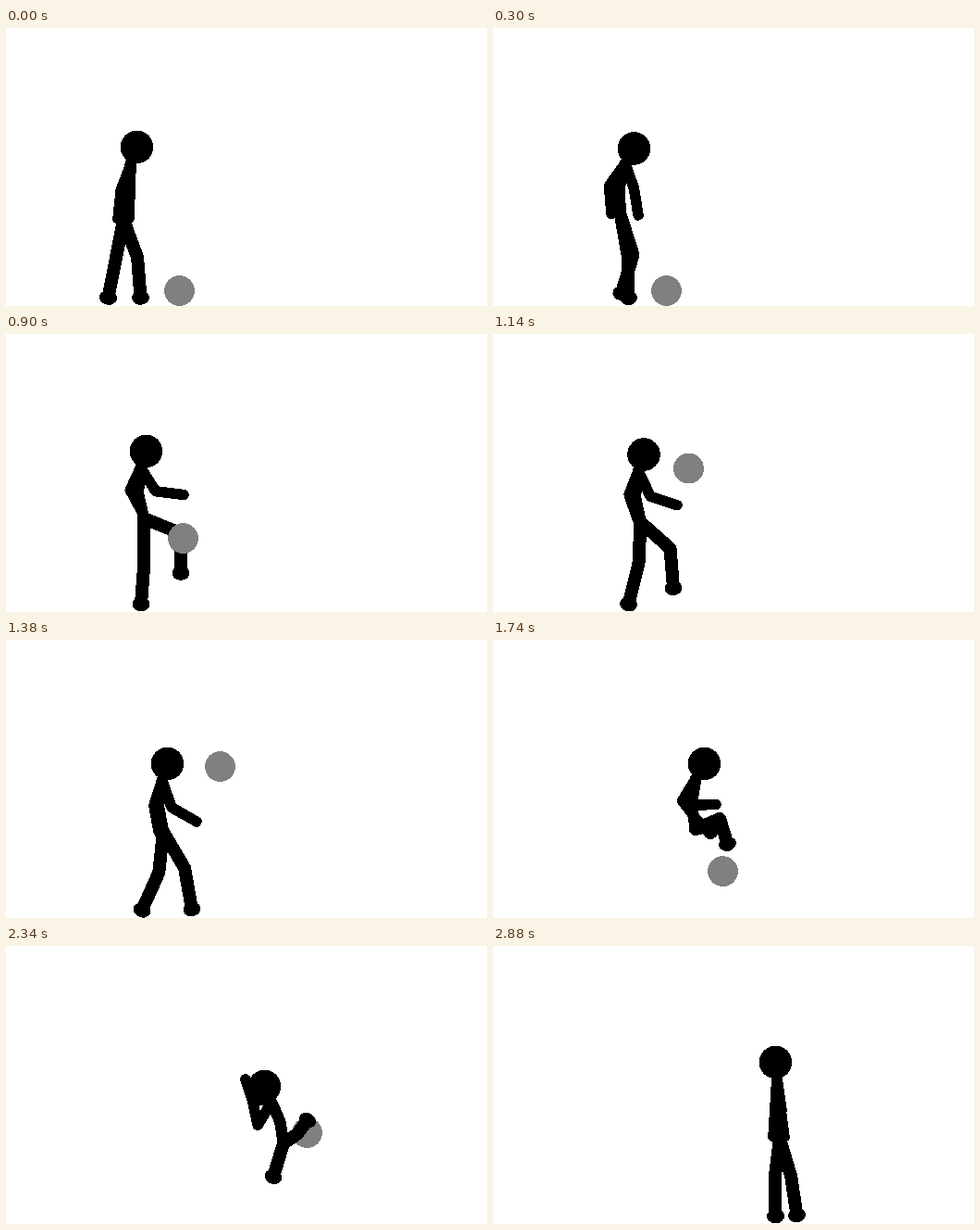
These frames come from a looping animation (520x300 px, 2.94 s). An HTML page:

```html
<!DOCTYPE html>
<html lang="en">
<head>
<meta charset="utf-8">
<title>Ball juggling</title>
<style>
  html, body { margin: 0; width: 100%; height: 100%; overflow: hidden; background: #fff; }
  svg { display: block; width: 520px; height: 300px; }
  polyline { fill: none; stroke: #000; stroke-linecap: round; stroke-linejoin: round; }
</style>
</head>
<body>
<svg viewBox="0 0 520 300" shape-rendering="crispEdges"></svg>
<script>
const LOOP = 2940, STEP = 60;
const FLOOR = 283.5, GRAVITY = 1164, NECK = 18.5;
const svg = document.querySelector('svg');

function set(node, attrs) {
  for (const name in attrs) node.setAttribute(name, attrs[name]);
}

function add(tag, attrs) {
  const node = document.createElementNS('http://www.w3.org/2000/svg', tag);
  set(node, attrs);
  return svg.appendChild(node);
}

const line = width => add('polyline', { 'stroke-width': width });
const foot = () => add('ellipse', { rx: 9.5, ry: 7.8 });
const head = add('circle', { r: 17.8 });
const spine = line(12.5);
const arms = [line(11.5), line(11.5)];
const legs = [line(14), line(14)];
const feet = [foot(), foot()];
const ball = add('circle', { r: 16.4, fill: '#808080' });

// Each limb ends at x, y and bows sideways by an optional bend.
const poses = [
  { time: 0, head: [141.5, 128.5], nod: [20], hip: [127, 207],
    arms: [[121, 206, -4], [133, 206]], legs: [[110.5, 291], [145.5, 291, 6]] },
  { time: 600, head: [163.5, 131.5], nod: [41], hip: [149.5, 199],
    arms: [[135, 195, -17], [181, 198, 5]], legs: [[167, 282, 26], [147.5, 291.5, 1]] },
  { time: 900, head: [151.5, 126.5], nod: [19], hip: [149, 199],
    arms: [[147, 192, -12], [192, 173.5, -13]], legs: [[189, 258, 24], [146, 291.5, 2]] },
  { time: 1380, head: [174.5, 133.5], nod: [18], hip: [170, 207],
    arms: [[165, 207, -7], [206, 196, -11]], legs: [[201, 290.5, 8], [147, 291.5, 7]] },
  { time: 1740, head: [228.5, 133.5], nod: [30], hip: [219, 204],
    arms: [[222, 196, -16], [241, 177.5, -24]], legs: [[253.5, 220, 21], [236, 206, 3]] },
  { time: 2340, head: [279.5, 151.5], nod: [-24], hip: [300, 213],
    arms: [[266, 165, 27], [259, 144, 11]], legs: [[326, 188, -3], [289, 249]] },
  { time: 2880, head: [305.5, 125.5], nod: [-4], hip: [310, 208],
    arms: [[303, 206], [315, 206]], legs: [[328.5, 290.5, 3], [305.5, 291.5, -3]] },
];

const rolling = [[0, 187.5], [480, 187.5], [600, 177.5], [780, 181.5],
  [1620, 251.5], [1740, 248.5], [2340, 325.5], [2940, 365]]
  .map(([time, x]) => ({ time, x: [x] }));

// Returns a reader that blends any part of the keys around the given time.
function blend(keys, time) {
  const next = Math.max(1, keys.findIndex(key => key.time >= time));
  const a = keys[next - 1], b = keys[next];
  const k = (time - a.time) / (b.time - a.time);
  return pick => {
    const [from, to] = [pick(a), pick(b)];
    return [0, 1, 2].map(i => (from[i] || 0) * (1 - k) + (to[i] || 0) * k);
  };
}

function drawLimb(node, [x0, y0], [x1, y1, bend]) {
  const dx = x1 - x0, dy = y1 - y0, k = bend / Math.hypot(dx, dy);
  const joint = [(x0 + x1) / 2 + dy * k, (y0 + y1) / 2 - dx * k];
  set(node, { points: [x0, y0, ...joint, x1, y1] });
  return joint;
}

function drawFigure(time) {
  const part = blend(poses, time);
  const [x, y] = part(p => p.head), [hipX, hipY] = part(p => p.hip);
  const tilt = part(p => p.nod)[0] * Math.PI / 180;
  const neck = [x - NECK * Math.sin(tilt), y + NECK * Math.cos(tilt)];
  set(head, { cx: x, cy: y });
  drawLimb(spine, neck, [hipX, hipY, tilt > 0 ? -4.5 : 3]);
  for (const side of [0, 1]) {
    drawLimb(arms[side], neck, part(p => p.arms[side]));
    const ankle = part(p => p.legs[side]);
    const knee = drawLimb(legs[side], [hipX, hipY], ankle);
    const turn = Math.atan2(ankle[1] - knee[1], ankle[0] - knee[0]) * 180 / Math.PI - 90;
    set(feet[side], { transform: `translate(${ankle[0]} ${ankle[1]}) rotate(${turn})` });
  }
}

// The ball is flicked off the floor, bounces once and drops out of view.
function ballHeight(time) {
  const flight = (from, speed) => {
    const t = (time - from) / 1000;
    return FLOOR - speed * t + GRAVITY / 2 * t * t;
  };
  if (time < 780) return FLOOR;
  return time < 1800 ? Math.min(FLOOR, flight(780, 594)) : flight(1800, 466);
}

function draw(time) {
  drawFigure(time);
  set(ball, { cx: blend(rolling, time)(key => key.x)[0], cy: ballHeight(time) });
  const behind = time >= 1800;
  if (behind !== (svg.firstChild === ball)) svg.insertBefore(ball, behind ? svg.firstChild : null);
}

const start = performance.now();
function tick() {
  const time = (performance.now() - start) % LOOP;
  draw(Math.floor(time / STEP) * STEP);
  requestAnimationFrame(tick);
}
tick();
</script>
</body>
</html>
```
